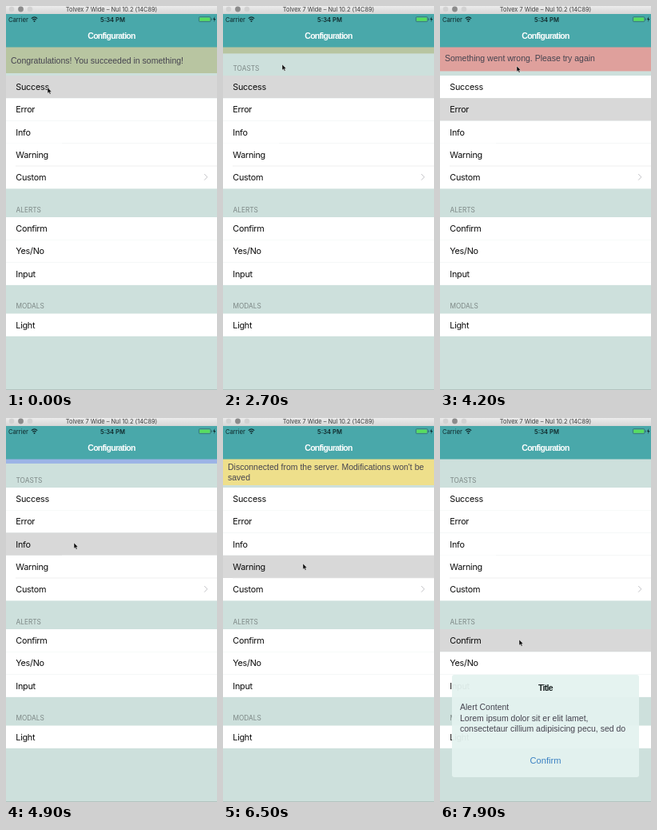
Animation, 264 px wide and 480 px high, one loop 8000 ms. Source, as an HTML page:

```html
<!DOCTYPE html>
<html lang="en">
<head>
<meta charset="utf-8">
<title>Configuration</title>
<style>
  html, body { margin: 0; width: 100%; height: 100%; overflow: hidden; background: #cde0dc; }
  svg { display: block; width: 100vw; height: 100vh; }
  text { font-family: Inter, Roboto, sans-serif; }
  .window { font-size: 7.4px; fill: #3c3c3c; }
  .status { font-size: 7.8px; fill: #10292b; letter-spacing: -.1px; }
  .clock { font-size: 7.6px; font-weight: 600; fill: #10292b; }
  .heading { font: bold 10.5px "Liberation Sans", Arial, sans-serif; letter-spacing: -.72px; fill: #fff; }
  .dark { fill: #1c2424; }
  .label { font-size: 8.3px; fill: #7d8886; }
  .row { font-size: 10.85px; letter-spacing: -.28px; fill: #0c0c0c; }
  .body { font: 10.5px "Liberation Sans", Arial, sans-serif; fill: #45434f; }
  .action { font: 11.1px "Liberation Sans", Arial, sans-serif; fill: #3a80c2; }
  .mid { text-anchor: middle; }
</style>
</head>
<body>
<svg id="stage" viewBox="0 0 264 480" preserveAspectRatio="none">
  <defs>
    <linearGradient id="chrome" x2="0" y2="1"><stop stop-color="#ececec"/><stop offset="1" stop-color="#d6d6d6"/></linearGradient>
  </defs>
  <rect width="264" height="480" fill="#cde0dc"/>
  <g id="list"></g>
  <g id="toasts"></g>

  <rect y="10" width="264" height="41.5" fill="#49a8aa"/>
  <text class="heading mid" x="132" y="41">Configuration</text>
  <text class="status" x="3" y="19.7">Carrier</text>
  <g fill="none" stroke="#10292b" stroke-width="1.2">
    <path d="M31.8 15.6Q35.5 12.2 39.2 15.6M33.3 17.3Q35.5 15.3 37.7 17.3"/>
    <circle cx="35.5" cy="19" r=".4"/>
  </g>
  <text class="clock mid" x="133.5" y="19.7">5:34 PM</text>
  <rect x="241.4" y="13.6" width="14.6" height="6" rx="1.2" fill="none" stroke="#2f5d5c" stroke-width=".6"/>
  <rect x="242.2" y="14.4" width="13" height="4.4" rx=".6" fill="#58dc5f"/>
  <rect x="256.6" y="15.6" width="1" height="2" fill="#2f5d5c"/>
  <path d="M261.4 13L259 17h1.6l-.6 3 2.4-4h-1.6z" fill="#10292b"/>

  <rect width="264" height="10" fill="url(#chrome)"/>
  <circle cx="7" cy="4" r="3.3" fill="#d2d2d2"/>
  <circle cx="18.5" cy="4" r="3.4" fill="#8b8b8b"/>
  <circle cx="30" cy="4" r="3.3" fill="#d2d2d2"/>
  <text class="window mid" x="132" y="7">Tolvex 7 Wide – Nul 10.2 (14C89)</text>

  <g id="alert">
    <rect x="15" width="234" height="128" rx="3" fill="#e4f3f0" fill-opacity=".95"/>
    <text class="heading dark mid" x="132" y="20">Title</text>
    <text class="body dark" x="25" y="44">Alert Content</text>
    <text class="body dark" x="25" y="57.5">Lorem ipsum dolor sit er elit lamet,</text>
    <text class="body dark" x="25" y="70.5">consectetaur cillium adipisicing pecu, sed do</text>
    <text class="action mid" x="132" y="111">Confirm</text>
  </g>
  <rect y="479" width="264" height="1" fill="#b3c3c0"/>
  <path id="cursor" d="M0 0V7.2L1.7 5.7 2.8 8.3 4.1 7.7 3 5.2H5.2Z" fill="#111" stroke="#fff" stroke-width=".4"/>
</svg>
<script>
const LOOP = 8000, SLIDE = 300, ROW = 28.25, TOAST_TOP = 51, TOAST_HEIGHT = 33;
const byId = id => document.getElementById(id);

function add(parent, tag, attrs, content = '') {
  const el = document.createElementNS('http://www.w3.org/2000/svg', tag);
  for (const name in attrs) el.setAttribute(name, attrs[name]);
  el.textContent = content;
  return parent.appendChild(el);
}

const sections = [
  { label: 'TOASTS', top: 87, rows: ['Success', 'Error', 'Info', 'Warning', 'Custom'] },
  { label: 'ALERTS', top: 264, rows: ['Confirm', 'Yes/No', 'Input'] },
  { label: 'MODALS', top: 384.5, rows: ['Light'] }
];
const rowRects = {};
for (const { label, top, rows } of sections) {
  add(byId('list'), 'text', { class: 'label', x: 12.5, y: top - 6.5 }, label);
  rows.forEach((name, i) => {
    const y = top + i * ROW;
    rowRects[name] = add(byId('list'), 'rect', { y, width: 264, height: ROW + .1 });
    add(byId('list'), 'text', { class: 'row', x: 12.3, y: y + 18 }, name);
  });
}
add(byId('list'), 'rect', { x: 70, y: 171, width: 194, height: .5, fill: '#eee' });
add(byId('list'), 'rect', { x: 12, y: 199.7, width: 252, height: .6, fill: '#e3e3e3' });
add(byId('list'), 'path', { d: 'M248.2 210l3.6 3.8-3.6 3.8', fill: 'none', stroke: '#c3c3c7' });

const toasts = [
  { show: -SLIDE, hide: 2500, color: '#b8c5a1', lines: ['Congratulations! You succeeded in something!'] },
  { show: 3500, hide: 4150, color: '#dfa09c', lines: ['Something went wrong. Please try again'] },
  { show: 4820, hide: 5550, color: '#9cb4e6', lines: ['You received a new message. Check your inbox'] },
  { show: 6200, hide: 7000, color: '#eedf8b', lines: ["Disconnected from the server. Modifications won't be", 'saved'] }
];
for (const toast of toasts) {
  toast.el = add(byId('toasts'), 'g', {});
  add(toast.el, 'rect', { width: 264, height: TOAST_HEIGHT, fill: toast.color });
  const first = toast.lines.length > 1 ? 14 : 20.7;
  toast.lines.forEach((line, i) => add(toast.el, 'text', { class: 'body', x: 6, y: first + i * 13 }, line));
}

// [time, row]
const selections = [[0, 'Success'], [3500, 'Error'], [4800, 'Info'], [6200, 'Warning'], [7600, 'Confirm']];
// [time, x, y] of the pointer tip
const pointer = [
  [0, 52, 102], [600, 52, 102], [1400, 52, 126], [2100, 52, 126],
  [2500, 74, 73], [2800, 74, 73], [3400, 62, 137], [3550, 62, 136],
  [4100, 96, 75], [4300, 96, 75], [4750, 85, 156], [4950, 85, 156],
  [5500, 115, 75], [5750, 115, 75], [6200, 100, 182], [6550, 100, 182],
  [7000, 113, 74], [7200, 113, 74], [7600, 99, 277], [LOOP, 99, 277]
];

const progress = (t, start, duration) => Math.min(1, Math.max(0, (t - start) / duration));
const smooth = p => p * p * (3 - 2 * p);
const move = (el, x, y) => el.setAttribute('transform', `translate(${x} ${y})`);

function draw(t) {
  const selected = selections.filter(([time]) => time <= t).pop()[1];
  for (const name in rowRects) rowRects[name].setAttribute('fill', name === selected ? '#d8d8d8' : '#fff');

  for (const { el, show, hide } of toasts) {
    const shown = smooth(progress(t, show, SLIDE)) - smooth(progress(t, hide, SLIDE));
    move(el, 0, TOAST_TOP + (shown - 1) * TOAST_HEIGHT);
    el.setAttribute('visibility', shown > 0 ? 'visible' : 'hidden');
  }

  const rise = progress(t, 7700, 200);
  move(byId('alert'), 0, 480 - 159 * rise ** 1.5);

  const next = pointer.findIndex(([time]) => time > t);
  const [t0, x0, y0] = pointer[next - 1], [t1, x1, y1] = pointer[next];
  const p = smooth(progress(t, t0, t1 - t0));
  move(byId('cursor'), x0 + (x1 - x0) * p, y0 + (y1 - y0) * p);
}

function tick() {
  draw(performance.now() % LOOP);
  requestAnimationFrame(tick);
}
tick();
</script>
</body>
</html>
```
